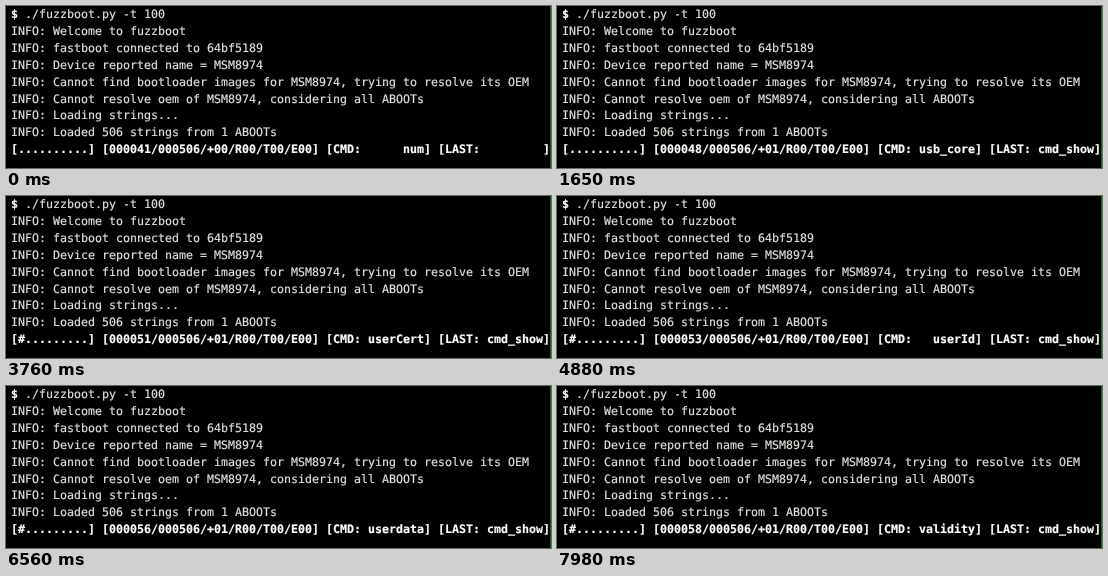
Animation of 545x162 px, one loop 8000 ms. Source, as an HTML page:

```html
<!DOCTYPE html>
<html>
<head>
<meta charset="utf-8">
<style>
html, body { margin: 0; width: 100%; height: 100%; overflow: hidden; background: #000; }
body::after {
  content: ""; position: absolute; left: 544px; top: 0;
  width: 1px; height: 162px; background: #007000;
}
pre {
  position: absolute; left: 5px; top: .3px; margin: 0;
  font: 11.63px/16.85px "DejaVu Sans Mono", monospace;
  text-rendering: geometricPrecision;
  color: #e0e0dc;
  -webkit-text-stroke: .2px;
}
b { color: #fff; }
</style>
</head>
<body>
<pre><b>$</b> ./fuzzboot.py -t 100
INFO: Welcome to fuzzboot
INFO: fastboot connected to 64bf5189
INFO: Device reported name = MSM8974
INFO: Cannot find bootloader images for MSM8974, trying to resolve its OEM
INFO: Cannot resolve oem of MSM8974, considering all ABOOTs
INFO: Loading strings...
INFO: Loaded 506 strings from 1 ABOOTs
<b id="status"></b></pre>
<script>
const LOOP = 8000, FIRST = 41, TOTAL = 506, FOUND_AT = 1650;
const commands = ['num', 'partitio', 'reboot', 'serialno', 'status', 'unlock', 'cmd_show',
  'usb_core', 'usb_dev', 'usb_ifac', 'userCert', 'userData', 'userId', 'userKey',
  'userName', 'userdata', 'valid', 'validity'];
const quickSteps = [20, 120, 140, 160, 260, 280];
const status = document.getElementById('status');
const pad = (n, width) => String(n).padStart(width, '0');

// A quick run, a pause on the command that succeeds, then a steady pace.
function indexAt(t) {
  if (t < FOUND_AT) return quickSteps.filter(s => s <= t).length;
  return 7 + Math.floor((t - 1270) / 630);
}

function statusAt(t) {
  const i = indexAt(t), n = FIRST + i, found = t >= FOUND_AT;
  const bar = '#'.repeat(Math.floor(n * 10 / TOTAL)).padEnd(10, '.');
  const counts = `${pad(n, 6)}/${pad(TOTAL, 6)}/+${pad(+found, 2)}/R00/T00/E00`;
  const last = found ? 'cmd_show' : '';
  return `[${bar}] [${counts}] [CMD: ${commands[i].padStart(8)}] [LAST: ${last.padStart(8)}]`;
}

const start = performance.now();
function draw() {
  const text = statusAt((performance.now() - start) % LOOP);
  if (status.textContent !== text) status.textContent = text;
  requestAnimationFrame(draw);
}
draw();
</script>
</body>
</html>
```
